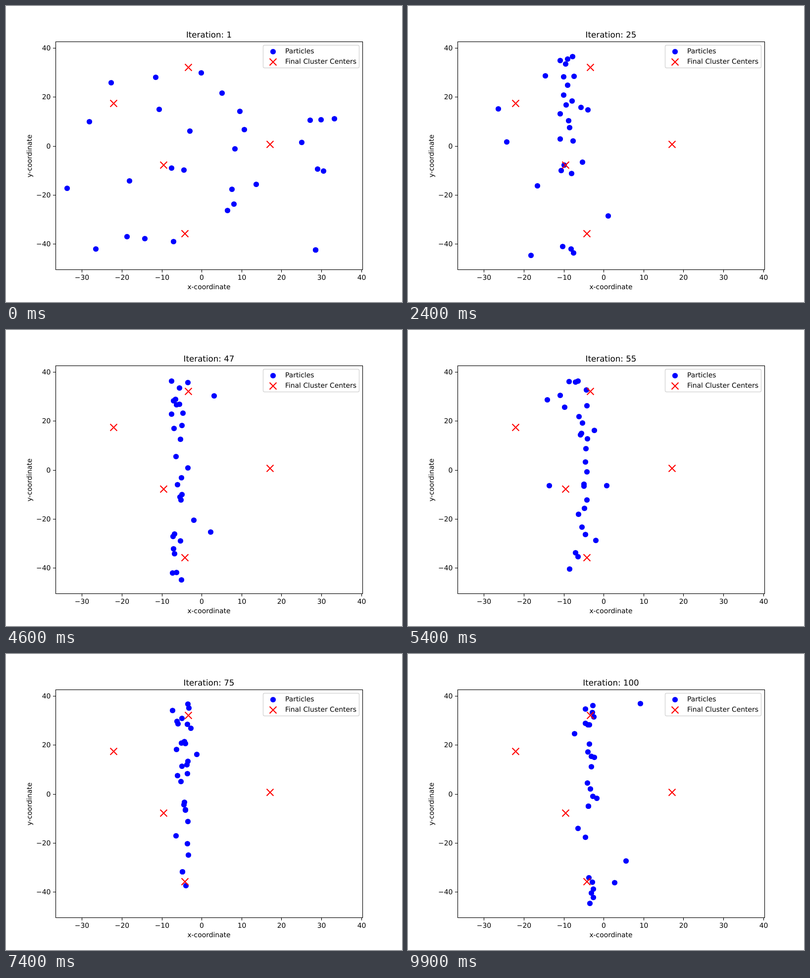
An HTML page for the animation above (10 s loop, 800 by 600 pixels).

```html
<!DOCTYPE html>
<html lang="en">
<head>
<meta charset="utf-8">
<title>Particle clusters</title>
<style>
  html, body { margin: 0; width: 100%; height: 100%; overflow: hidden; background: #fff; }
  svg { display: block; width: 800px; height: 600px; }
  text { font: 13.89px "DejaVu Sans", sans-serif; fill: #000; text-rendering: geometricPrecision; }
  #title { font-size: 16.67px; }
  .mid { text-anchor: middle; }
  .end { text-anchor: end; }
  .axis { fill: none; stroke: #000; stroke-width: 1.11; }
  .dot { fill: #00f; }
  .cross { fill: none; stroke: #f00; stroke-width: 2.08; }
</style>
</head>
<body>
<svg viewBox="0 0 800 600">
  <defs><clipPath id="plot"><rect x="100" y="72" width="620" height="462"/></clipPath></defs>
  <rect width="800" height="600" fill="#fff"/>
  <g id="dots" clip-path="url(#plot)"></g>
  <g id="centers"></g>
  <g id="axes"><rect class="axis" x="100.5" y="72.5" width="620" height="462"/></g>
  <text id="title" class="mid" x="410" y="64"></text>
  <text class="mid" x="410" y="574">x-coordinate</text>
  <text class="mid" transform="translate(52 304) rotate(-90)">y-coordinate</text>
  <g id="legend">
    <rect x="519.5" y="79.5" width="194" height="46" rx="2.8"
      fill="#fff" stroke="#ccc" stroke-width="1.39" opacity=".8"/>
    <circle class="dot" cx="539.5" cy="92.5" r="5.6"/>
    <text x="564" y="96">Particles</text>
    <text x="564" y="117">Final Cluster Centers</text>
  </g>
</svg>
<script>
const $ = id => document.getElementById(id);

function add(parent, tag, attrs, text = '') {
  const el = document.createElementNS('http://www.w3.org/2000/svg', tag);
  for (const key in attrs) el.setAttribute(key, attrs[key]);
  el.textContent = text;
  parent.append(el);
  return el;
}

const label = n => String(n).replace('-', '\u2212');
const snap = v => Math.floor(v) + 0.5;

for (let n = -30; n <= 40; n += 10) {
  const x = snap(395.7 + n * 8.06);
  add($('axes'), 'path', { class: 'axis', d: `M${x} 535v5` });
  add($('axes'), 'text', { class: 'mid', x, y: 555 }, label(n));
}
for (let n = -40; n <= 40; n += 20) {
  const y = snap(284.05 - n * 4.97);
  add($('axes'), 'path', { class: 'axis', d: `M100 ${y}h-5` });
  add($('axes'), 'text', { class: 'end', x: 90.3, y: y + 4.5 }, label(n));
}

const cross = (parent, x, y) => add(parent, 'path', {
  class: 'cross', d: `M${x - 6.95} ${y - 6.95}l13.9 13.9m0 -13.9l-13.9 13.9`
});
[[368.5, 124.5], [217.5, 197.5], [533.5, 280.5], [318.5, 322.5], [361.5, 461.5]]
  .forEach(([x, y]) => cross($('centers'), x, y));
cross($('legend'), 539.5, 113.5);

// Opening scatter; everything after it follows from the rules below.
const scatter = [
  [212, 155], [302, 144], [394, 135], [436, 176], [309, 209], [472, 213],
  [168, 234], [371, 253], [481, 250], [614, 231], [636, 230], [663, 228],
  [597, 276], [462, 289], [334, 328], [359, 332], [249, 354], [123, 369],
  [456, 371], [505, 361], [629, 330], [641, 334], [460, 401], [447, 414],
  [244, 467], [280, 471], [338, 477], [181, 492], [625, 494], [625, 494]
];

const STEPS = 100, STEP_MS = 100, TOP = 100, HEIGHT = 409, SKEW = 1.3;

function rnd(seed) {
  const v = Math.sin(seed * 12.9898 + 4.1) * 43758.5453;
  return v - Math.floor(v);
}

function bounce(v, lo, hi) {
  const w = hi - lo;
  const d = (((v - lo) % (2 * w)) + 2 * w) % (2 * w);
  return lo + (d > w ? 2 * w - d : d);
}

// The swarm gathers on a column that drifts right.
const column = t => 368 - 75 * Math.exp(-((t / 42) ** 1.6));

function place([x0, y0], i, t) {
  const r = k => rnd(i * 7 + k);
  const late = t >= 44;
  const fade = Math.exp(-t / 6);
  const wave = Math.sin(t * (0.3 + 0.5 * r(1)) + 6.283 * r(2));
  const sway = (8 + 18 * Math.exp(-t / 25)) * wave;
  // Now and then a particle shoots far off the column.
  const flare = (late ? 110 : 380) * r(3) ** 2 * wave ** 25;
  const x = column(t) + (x0 - column(0)) * fade + (sway + flare) * (1 - fade);

  const u = ((y0 - TOP) / HEIGHT) ** (1 / SKEW);
  const speed = (0.03 + 0.1 * r(4)) * (r(5) < 0.5 ? -1 : 1);
  const y = TOP + HEIGHT * bounce(u + speed * t, 0, 1) ** SKEW;

  return [late ? bounce(x, 188, 480) : bounce(x, 106, 708), y];
}

const dots = scatter.map(() => add($('dots'), 'circle', { class: 'dot', r: 5.6 }));
let shown = 0;

function draw(n) {
  $('title').textContent = `Iteration: ${n}`;
  dots.forEach((dot, i) => {
    const [x, y] = place(scatter[i], i, n - 1);
    dot.setAttribute('cx', snap(x + 0.01));
    dot.setAttribute('cy', snap(y + 0.01));
  });
}

const start = performance.now();
function tick() {
  const n = Math.floor((performance.now() - start) / STEP_MS) % STEPS + 1;
  if (n !== shown) draw(shown = n);
  requestAnimationFrame(tick);
}
tick();
</script>
</body>
</html>
```
